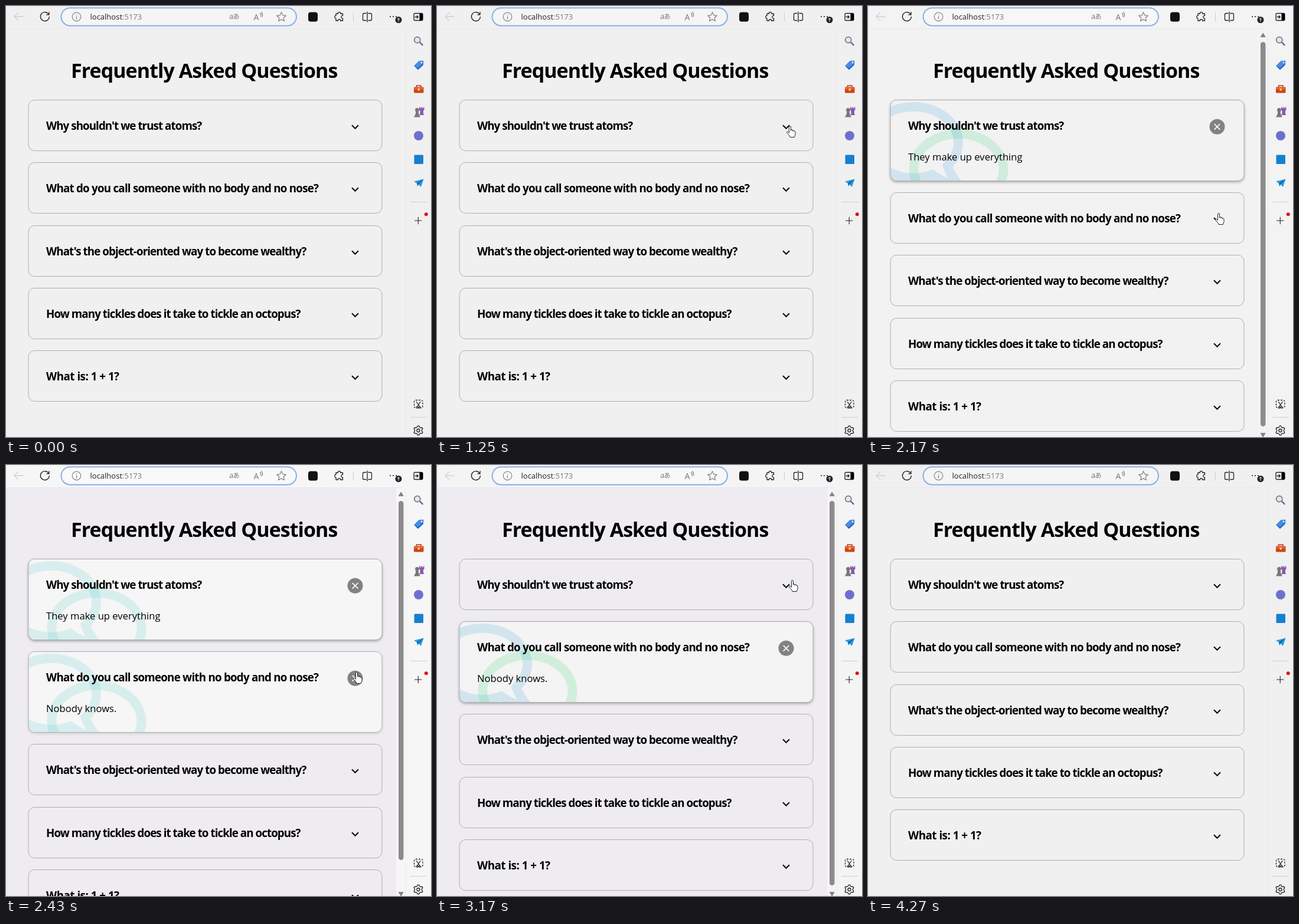
These frames come from a looping animation (720 px wide and 731 px high, 4.79 s). An HTML page:

```html
<!DOCTYPE html>
<html lang="en">
<head>
<meta charset="utf-8">
<title>Frequently Asked Questions</title>
<style>
  html, body { margin: 0; width: 100%; height: 100%; overflow: hidden; background: #f0f0f0; }
  svg { display: block; }
  text { font-family: "Open Sans", "Noto Sans", sans-serif; white-space: pre; }
  .title { font-size: 34px; font-weight: 700; letter-spacing: -.95px; }
  .question { font-size: 18.8px; font-weight: 700; }
  .answer { font-size: 16.6px; }
  .line { fill: none; stroke: #222; stroke-width: 1.3; stroke-linecap: round; stroke-linejoin: round; }
  .soft { stroke: #777; stroke-width: 1.1; }
</style>
</head>
<body>
<svg id="stage" width="720" height="731" viewBox="0 0 720 731">
  <defs>
    <path id="bubble" d="M256 32C114.6 32 0 125.1 0 240c0 47.6 19.9 91.2 52.9 126.3C38 405.7 7 439.1 6.5 439.5c-6.6 7-8.4 17.2-4.6 26S14.4 480 24 480c61.5 0 110-25.7 139.1-46.3C192 442.8 223.2 448 256 448c141.4 0 256-93.1 256-208S397.4 32 256 32zm0 368c-26.7 0-53.1-4.1-78.4-12.1l-22.7-7.2-19.5 13.8c-14.3 10.1-33.9 21.4-57.5 29 7.3-12.1 14.4-25.7 19.9-40.2l10.6-28.1-20.6-21.8C69.7 314.1 48 282.2 48 240c0-88.2 93.3-160 208-160s208 71.8 208 160-93.3 160-208 160z"/>
    <clipPath id="inside"><rect x=".5" y=".5" width="598" height="136" rx="10"/></clipPath>
  </defs>

  <rect id="chrome" width="720" height="731"/>
  <path id="page" d="M0 38H668Q676.500 38 676.500 46V731H0Z"/>
  <path d="M0 38.500H668Q677 38.500 677 47V731" fill="none" stroke="#000" stroke-opacity=".035"/>
  <text class="title" x="110" y="122">Frequently Asked Questions</text>
  <g id="cards"></g>

  <g id="scroll">
    <rect id="track" x="661" y="39" width="15.500" height="692"/>
    <rect id="thumb" x="665" y="61" width="8.500" rx="4.250" fill="#8b8b8b"/>
    <path d="M669.200 46L673.200 52.500H665.200ZM669.200 731L673.200 724.500H665.200Z" fill="#858585" stroke="#858585" stroke-linejoin="round"/>
  </g>

  <!-- toolbar -->
  <path class="line" d="M29 18H14M20.500 11.500L14 18L20.500 24.500" style="stroke:#d0d0d0"/>
  <path class="line" d="M72.300 14.200A7.500 7.500 0 1 0 73.300 18.500M73 10.500V14.800H68.700"/>
  <rect x="93.500" y="3.200" width="398.500" height="30.300" rx="15.150" fill="#fff" fill-opacity=".3" stroke="#86aee8" stroke-width="2"/>
  <g class="line soft">
    <circle cx="119.500" cy="18.300" r="7.300"/>
    <path d="M119.500 17.500V22M119.500 14.700V14.900"/>
    <path d="M430.500 12.500Q433 15 431.500 18M432.500 10.500Q436 14 433.800 18.500"/>
    <path id="star"/>
  </g>
  <text x="142.500" y="23" font-size="13" fill="#222">localhost<tspan fill="#777">:5173</tspan></text>
  <text x="378" y="22" font-size="13" fill="#777">a</text>
  <text x="384.500" y="22" font-size="11" fill="#777" style="font-family:'Noto Sans CJK JP','Noto Sans CJK',sans-serif">あ</text>
  <text x="419.500" y="23.500" font-size="14" fill="#777">A</text>
  <rect x="512" y="10.500" width="16" height="16" rx="4" fill="#111"/>
  <path class="line" d="M559 13H562.500C561 9.500 568 9.500 566.500 13H570.500V16.500C567 15.500 567 21.800 570.500 20.800V25H566.500C568 22 561 22 562.500 25H559V20.800C556 21.800 556 15.500 559 16.500Z"/>
  <path d="M588.500 11V26" stroke="#ccc"/>
  <path class="line" d="M610 12.500H606.500Q604.500 12.500 604.500 14.500V22.500Q604.500 24.500 606.500 24.500H610M614 12.500H617.500Q619.500 12.500 619.500 14.500V22.500Q619.500 24.500 617.500 24.500H614M612 10V27"/>
  <path class="line" d="M651 18h.1M656 18h.1M661 18h.1" style="stroke-width:2"/>
  <circle cx="665" cy="23.500" r="5.500" fill="#222"/>
  <path d="M665 26.500V21M662.800 22.800L665 20.600L667.200 22.800" fill="none" stroke="#fff"/>
  <rect x="691" y="12.500" width="15" height="12" rx="2" class="line"/>
  <path d="M700.500 12.500H704Q706 12.500 706 14.500V22.500Q706 24.500 704 24.500H700.500Z"/>
  <path class="line" d="M693 18.500H698M696.200 16.500L698.300 18.500L696.200 20.500"/>

  <!-- sidebar -->
  <path d="M701 61.500L705.500 66.200" stroke="#6b62a8" stroke-width="2.500" stroke-linecap="round"/>
  <circle cx="696.800" cy="57.500" r="5" fill="#e5e8ee" stroke="#858591" stroke-width="2"/>
  <path d="M699.500 93.500L707 93L706.500 100L698 108L691.500 101.500Z" fill="#4b8ee0" stroke="#4b8ee0" stroke-linejoin="round"/>
  <path d="M691.500 101.500L698 108L706.500 100V97L698 105Z" fill="#2469c4"/>
  <circle cx="704" cy="96" r="1.200" fill="#fff"/>
  <path d="M695.500 138V135H703V138" fill="none" stroke="#a83a16" stroke-width="1.600"/>
  <rect x="691" y="137.500" width="16.500" height="10" rx="1.500" fill="#c9461c"/>
  <path d="M691 138.500Q691 137.500 692 137.500H706.500Q707.500 137.500 707.500 138.500V141.500H691Z" fill="#e8642c"/>
  <rect x="697.500" y="140" width="3.500" height="3.500" rx=".8" fill="#ffd28a"/>
  <path d="M700 171.500h2v2h1.500v-2h2v2h1.500v-2h1.500v5l-1.500 1v5l1.500 2.500H700l1.500-2.500v-5l-1.500-1Z" fill="#8a57b5"/>
  <circle cx="696.500" cy="176.500" r="3.400" fill="#777"/>
  <path d="M694.500 179H698.500L699.500 184L702 188.500H691L693.500 184Z" fill="#777"/>
  <circle cx="699" cy="220" r="8" fill="#6d70cf"/>
  <rect x="691.500" y="252.500" width="15.500" height="15.500" rx="1.500" fill="#1680d0"/>
  <path d="M691 297.500L707.500 293.500L703 307L698.800 302.800Z" fill="#249de0"/>
  <path d="M696 300.500L707.500 293.500L698.800 302.800L697 306Z" fill="#1265ad"/>
  <path d="M685 332.500H713M685 697.500H713" stroke="#cfcfcf"/>
  <path class="line" d="M692.500 364H704M698.300 358.200V369.800" style="stroke-width:1.100"/>
  <circle cx="711.800" cy="353.300" r="3" fill="#e01212"/>
  <rect x="691.500" y="668.500" width="14.500" height="13" rx="2.500" class="line" stroke-dasharray="3 2" style="stroke-linecap:butt"/>
  <path class="line" d="M695.500 671.500L700.500 679M702 671.500L697 679"/>
  <path d="M695.500 679.500h2.500v2.500h-2.500zM699.500 679.500h2.500v2.500h-2.500z" fill="none" stroke="#222"/>
  <path id="gear" class="line"/>
  <circle cx="698.500" cy="720" r="2.500" class="line"/>

  <g id="cursor" stroke-linejoin="round" fill="#fff" stroke="#222">
    <path id="arrow" d="M0 0V14L3.200 11L5.300 15.800L7.300 14.900L5.200 10.300H9.500Z"/>
    <path id="hand" transform="translate(-6.500 0)" d="M5 1.800C5 .2 8 .2 8 1.800V8.200V7.300C8.300 6.300 10.300 6.500 10.500 7.800V9V8C11 7.200 12.800 7.500 13 8.800V10V9.200C13.800 8.500 15.500 9 15.500 10.800V14.500C15.500 16.500 14 17.500 14 19.500H6.500C6.300 17 3 14.500 1.200 11.800C.6 10.400 2.200 9.600 3.300 10.600L5 12.300Z"/>
  </g>
</svg>

<script>
const LOOP = 4790;
const $ = id => document.getElementById(id);
const set = (el, attrs) => { for (const k in attrs) el.setAttribute(k, attrs[k]); };
const show = (el, on) => el.style.display = on ? '' : 'none';

// question, tracking, answer, open time, close time
const faqs = [
  ["Why shouldn't we trust atoms?", -.95, 'They make up everything', 1510, 3170],
  ['What do you call someone with no body and no nose?', -.78, 'Nobody knows.', 2430, 4010],
  ["What's the object-oriented way to become wealthy?", -.93],
  ['How many tickles does it take to tickle an octopus?', -.94],
  ['What is: 1 + 1?', -.5]
];

// start time, page, chrome, open card, bubble colours
const themes = [
  [0, '#f0f0f0', '#f0f0f0', '#f2f2f2', '#3498db', '#2ecc71'],
  [1510, '#f2f2f2', '#f3f3f3', '#f2f2f2', '#3498db', '#2ecc71'],
  [2430, '#eeecf1', '#f6f6f6', '#f5f6f5', '#46c4cb', '#46c4c0'],
  [3170, '#eeecf1', '#f4f4f4', '#f3f4f3', '#3498db', '#2ecc71'],
  [4010, '#f0f0f0', '#f0f0f0', '#f2f2f2', '#3498db', '#2ecc71']
];

// start time, x, y, shape
const moves = [
  [0], [230, 652, 300, 'arrow'], [350, 640, 262, 'arrow'], [470, 628, 235, 'arrow'],
  [590, 618, 215, 'arrow'], [730, 613, 206, 'arrow'], [850, 611, 204, 'arrow'],
  [1130, 604, 205, 'hand'], [1250, 598, 203, 'hand'], [1650, 595, 250, 'hand'],
  [1770, 593, 310, 'hand'], [1910, 593, 335, 'hand'], [2030, 593, 347, 'hand'],
  [2170, 594, 351, 'hand'], [2850, 598, 250, 'hand'], [3010, 602, 195, 'hand'],
  [3310, 600, 230, 'hand'], [3450, 594, 285, 'hand'], [3610, 593, 299, 'hand'],
  [4150, 640, 330, 'arrow'], [4270]
];

const at = (list, t) => list.filter(row => row[0] <= t).pop();

function polar(n, cx, cy, radius, turn) {
  return 'M' + Array.from({ length: n }, (_, i) => {
    const a = (i + turn) / n * 2 * Math.PI - Math.PI / 2, r = radius(i);
    return (cx + r * Math.cos(a)).toFixed(2) + ' ' + (cy + r * Math.sin(a)).toFixed(2);
  }).join('L') + 'Z';
}
set($('star'), { d: polar(10, 466.5, 18.8, i => i % 2 ? 3.9 : 8.2, 0) });
set($('gear'), { d: polar(24, 698.5, 720, i => i % 4 < 2 ? 8 : 6, -.5) });

const cards = faqs.map(([question, track, answer, from, to]) => {
  const g = document.createElementNS('http://www.w3.org/2000/svg', 'g');
  g.innerHTML = `
    <rect class="box" width="599" rx="10.500" stroke="#adadad"/>
    <g class="more">
      <g clip-path="url(#inside)">
        <use class="b1" href="#bubble" opacity=".17" transform="translate(123 -7) scale(-.328 .328)"/>
        <use class="b2" href="#bubble" opacity=".17" transform="translate(31.500 39) scale(.328)"/>
      </g>
      <circle cx="553.500" cy="45.300" r="13" fill="#808380"/>
      <path d="M548.700 40.500l9.600 9.600m0-9.600l-9.600 9.600" stroke="#fff" stroke-width="1.700"/>
      <text class="answer" x="30" y="102.500">${answer || ''}</text>
    </g>
    <path class="chevron" d="M548 42.700L553.500 48.200L559 42.700" fill="none" stroke="#111" stroke-width="2.200"/>
    <text class="question" x="30" y="50.500" style="letter-spacing:${track}px">${question}</text>`;
  $('cards').append(g);
  const part = name => g.querySelector('.' + name);
  return { g, from, to, box: part('box'), more: part('more'), chevron: part('chevron'), b1: part('b1'), b2: part('b2') };
});

function draw(t) {
  const [, page, chrome, fill, blue, green] = at(themes, t);
  set($('page'), { fill: page });
  set($('chrome'), { fill: chrome });
  set($('track'), { fill: chrome });

  let y = 159, opened = 0;
  for (const c of cards) {
    const open = t >= c.from && t < c.to;
    set(c.g, { transform: `translate(38 ${Math.round(y) + .5})` });
    set(c.box, { height: open ? 137 : 86, fill: open ? fill : 'none' });
    const age = t - c.from;
    const shade = age < 140 ? .12 : age < 260 ? .22 : .3;
    c.box.style.filter = open ? `drop-shadow(0 2px 2px rgba(0,0,0,${shade}))` : 'none';
    show(c.more, open);
    show(c.chevron, !open);
    set(c.b1, { fill: blue });
    set(c.b2, { fill: green });
    y += open ? 157.1 : 106.3;
    opened += open;
  }

  show($('scroll'), opened);
  set($('thumb'), { height: opened > 1 ? 609 : 652 });

  const [, x, cy, shape] = at(moves, t);
  show($('cursor'), shape);
  show($('arrow'), shape === 'arrow');
  show($('hand'), shape === 'hand');
  if (shape) set($('cursor'), { transform: `translate(${x} ${cy})` });
}

const start = performance.now();
function tick() {
  draw((performance.now() - start) % LOOP);
  requestAnimationFrame(tick);
}
tick();
</script>
</body>
</html>
```
